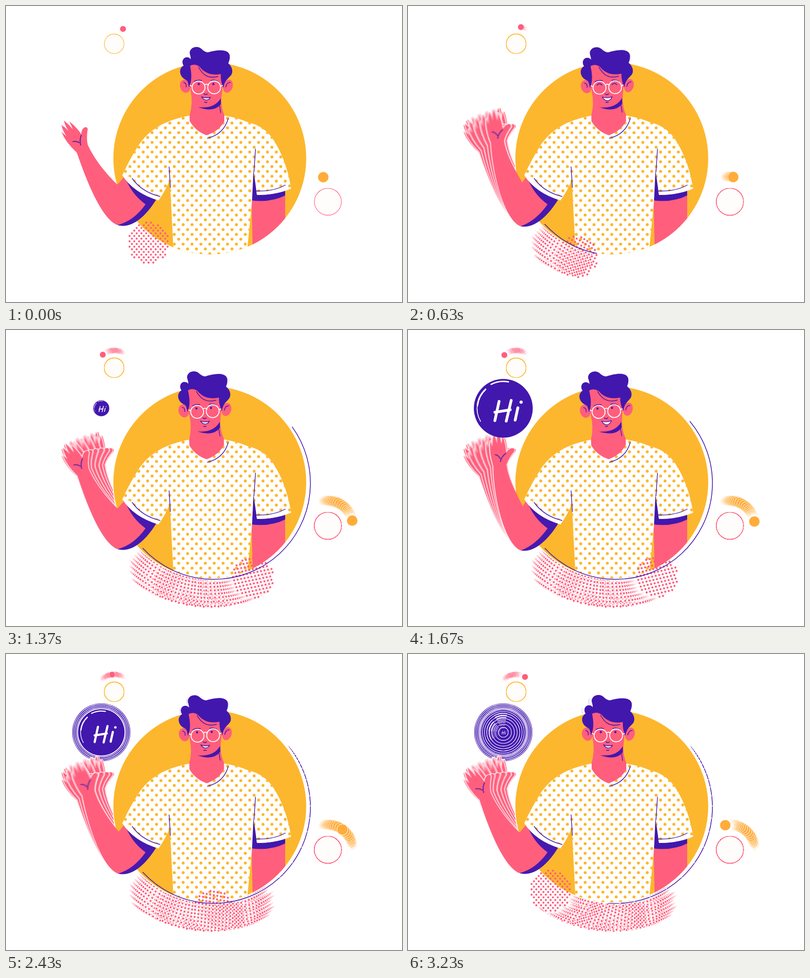
Animation, 800 px wide and 600 px high, one loop 3260 ms. Source, as an HTML page with a canvas:

```html
<!DOCTYPE html>
<html lang="en">
<head>
<meta charset="utf-8">
<title>Waving hello</title>
<style>
html, body { margin: 0; width: 100%; height: 100%; overflow: hidden; background: #fff; }
canvas { display: block; width: 800px; height: 600px; }
</style>
</head>
<body>
<canvas id="stage" width="800" height="600" role="img" aria-label="A man waves and says Hi"></canvas>
<script>
const YELLOW = '#fcb72e', PINK = '#ff5e7d', PURPLE = '#4217ae', ORANGE = '#ffac3b', PAPER = '#fffdfb';
const LOOP = 3260, STEPS = 98, STEP_MS = 100 / 3, WAVE = 14;
const TAU = Math.PI * 2, RAD = Math.PI / 180;
const ctx = document.getElementById('stage').getContext('2d');

// Helpers
const lerp = (a, b, t) => a + (b - a) * t;
const clamp = v => Math.max(0, Math.min(1, v));
const smooth = v => { v = clamp(v); return v * v * (3 - 2 * v); };
const polar = (x, y, r, deg) => [x + r * Math.cos(deg * RAD), y + r * Math.sin(deg * RAD)];

// Cubic ease with flat ends; x1 and x2 are the handle positions.
function ease(x, x1, x2) {
  let lo = 0, hi = 1;
  for (let i = 0; i < 24; i++) {
    const u = (lo + hi) / 2, v = 1 - u;
    if (3 * u * v * v * x1 + 3 * u * u * v * x2 + u * u * u < x) lo = u; else hi = u;
  }
  return lo * lo * (3 - 2 * lo);
}

function keyed(k, keys) {
  for (let i = 1; i < keys.length; i++) {
    const [a, from] = keys[i - 1], [b, to] = keys[i];
    if (k <= b) return lerp(from, to, smooth((k - a) / (b - a)));
  }
  return keys[keys.length - 1][1];
}

function rotate([x, y], [cx, cy], deg) {
  const c = Math.cos(deg * RAD), s = Math.sin(deg * RAD);
  return [cx + (x - cx) * c - (y - cy) * s, cy + (x - cx) * s + (y - cy) * c];
}

function disc(x, y, r) {
  const p = new Path2D();
  p.arc(x, y, Math.max(0, r), 0, TAU);
  return p;
}

function fill(c, path, color) {
  c.fillStyle = color;
  c.fill(typeof path === 'string' ? new Path2D(path) : path);
}

function line(c, path, color, width) {
  c.strokeStyle = color;
  c.lineWidth = width;
  c.lineCap = c.lineJoin = 'round';
  c.stroke(typeof path === 'string' ? new Path2D(path) : path);
}

function layer(w, h) {
  const el = document.createElement('canvas');
  el.width = w;
  el.height = h;
  return el.getContext('2d');
}

// Staggered rows of dots
function dotGrid(x0, y0, cols, rows, dx, dy, r, keep) {
  const p = new Path2D();
  for (let j = 0; j < rows; j++) {
    for (let i = 0; i < cols; i++) {
      const x = x0 + dx * (i + (j % 2) / 2), y = y0 + dy * j;
      if (keep && !keep(x, y)) continue;
      p.moveTo(x + r, y);
      p.arc(x, y, r, 0, TAU);
    }
  }
  return p;
}

// Torso
const backdrop = disc(411.7, 308.8, 194.8);
const torso = makeTorso();

function makeTorso() {
  const c = layer(800, 600);
  c.clip(backdrop);
  fill(c, 'M496 390L564 378V430L570 520H499Z', PINK);
  fill(c, 'M500 328L507 380L564 374V384Q535 399 495 394Z', PURPLE);
  const shirt = new Path2D('M371 222C318 232 290 252 270 279Q250 310 235 343Q258 379 308 394Q324 372 331 351L338 488V520H486L488 487L497 395L500 332L507 383Q546 383 576 370C571 338 560 300 538 268Q520 243 490 236Q466 226 441 222Z');
  fill(c, shirt, '#fff');
  c.save();
  c.clip(shirt);
  fill(c, dotGrid(223.4, 217.5, 21, 31, 17.93, 9.82, 3), YELLOW);
  fill(c, 'M250 346Q273 377 314 387L306 400L225 350ZM505 377Q540 377 566 364L580 372L507 390Z', '#fff');
  c.restore();
  line(c, 'M449 228Q440 260 407 268M329.5 326L332 368M504 290L501 336M255 349.5Q274 377 311 386M506 375Q541 376 564 363', PURPLE, 1.4);
  return c.canvas;
}

// Waving arm
const ARM = { x: 90, y: 190, w: 260, h: 280 };
const ELBOW = [235, 415], WRIST = [153, 291];
const armCache = [];

function drawArm(c, p) {
  const mid = rotate(WRIST, ELBOW, 14 * p);
  const hand = (x, y) => {
    const q = rotate([x, y], WRIST, 32 * p);
    return [q[0] + mid[0] - WRIST[0], q[1] + mid[1] - WRIST[1]];
  };
  const mix = (x, y, x2, y2) => [lerp(x, x2, p), lerp(y, y2, p)];
  const end = mix(225, 444, 228, 447);

  c.beginPath();
  c.moveTo(...hand(143, 297));
  c.bezierCurveTo(...mix(158, 340, 174, 345), ...mix(190, 430, 197, 435), ...end);
  c.quadraticCurveTo(262, 440, 284, 402);
  c.lineTo(262, 360);
  c.lineTo(239, 346);
  c.lineTo(...mix(225, 362, 232, 357));
  c.bezierCurveTo(...mix(202, 340, 222, 333), ...mix(178, 310, 205, 305), ...hand(165, 281));
  c.quadraticCurveTo(...hand(162, 268), ...hand(165, 249));
  c.quadraticCurveTo(...hand(163, 243), ...hand(157, 247));
  c.quadraticCurveTo(...hand(152, 252), ...hand(152, 260));
  c.quadraticCurveTo(...hand(144, 247), ...hand(128, 234));
  c.lineTo(...hand(135, 250));
  c.quadraticCurveTo(...hand(127, 240), ...hand(117, 232));
  c.quadraticCurveTo(...hand(119, 243), ...hand(127, 254));
  c.quadraticCurveTo(...hand(120, 246), ...hand(112, 241));
  c.quadraticCurveTo(...hand(114, 252), ...hand(122, 264));
  c.lineTo(...hand(112, 255));
  c.quadraticCurveTo(...hand(120, 276), ...hand(143, 297));
  c.fillStyle = PINK;
  c.fill();

  c.beginPath();
  c.moveTo(241, 348);
  c.quadraticCurveTo(254, 382, 282, 402);
  c.quadraticCurveTo(258, 436, ...end);
  c.bezierCurveTo(252, 452, 280, 430, 303, 393);
  c.closePath();
  c.fillStyle = PURPLE;
  c.fill();

  c.beginPath();
  c.moveTo(...hand(135, 275));
  c.quadraticCurveTo(...hand(142, 273), ...hand(148, 277));
  c.moveTo(...hand(152, 262));
  c.quadraticCurveTo(...hand(148, 272), ...hand(151, 282));
  c.strokeStyle = PURPLE;
  c.lineWidth = 1.7;
  c.lineCap = 'round';
  c.stroke();
}

// Average of several poses for motion blur, with a white rim to go beneath.
function armPose(n) {
  if (armCache[n]) return armCache[n];
  const blur = layer(ARM.w, ARM.h), rim = layer(ARM.w, ARM.h), samples = 5;
  blur.globalCompositeOperation = 'lighter';
  blur.globalAlpha = 1 / samples;
  for (let i = 0; i < samples; i++) {
    const one = layer(ARM.w, ARM.h);
    one.translate(-ARM.x, -ARM.y);
    const at = n + (i / (samples - 1) - 0.5) * 0.35;
    drawArm(one, 0.5 - 0.5 * Math.cos(at / WAVE * TAU));
    blur.drawImage(one.canvas, 0, 0);
  }
  for (let i = 0; i < 8; i++) {
    rim.drawImage(blur.canvas, ...polar(0, 0, 0.9, i * 45));
  }
  rim.globalCompositeOperation = 'source-in';
  rim.fillStyle = '#fff';
  rim.fillRect(0, 0, ARM.w, ARM.h);
  return armCache[n] = { body: blur.canvas, rim: rim.canvas };
}

// Head
const HAIR = new Path2D('M370 165C367 156 369 152 362 149C351 143 349 130 355 124Q357 121 359 121C353 112 359 103 366 104Q371 104 373 108C374 104 371 98 371 94C373 82 388 80 395 87Q402 94 408 94C425 89 449 86 452 100Q453 108 449 116C458 124 459 134 455 140C448 148 441 152 439 166Q433 152 434 138C411 142 399 133 391 123Q382 116 372 121C375 138 376 150 370 165Z');
const EARS = new Path2D();
EARS.ellipse(362, 162.5, 10.5, 13.5, -0.25, 0, TAU);
EARS.closePath();
EARS.ellipse(448.5, 162.5, 9.5, 13.5, 0.3, 0, TAU);
const NECK = 'M371 118L373 172Q378 196 371 221V233Q383 254 405 262Q430 254 441 234V221Q435 208 435 188L438 160V130L400 112Z';
const LENSES = 'M402 165.3A13 13 0 1 1 376 165.3A13 13 0 1 1 402 165.3ZM433.5 165A13 13 0 1 1 407.5 165A13 13 0 1 1 433.5 165ZM401 160Q405 157 409 160M376.5 163L372 161M433 163L437 161';

function turnHead(c, angle, draw) {
  c.save();
  c.translate(405, 250);
  c.rotate(angle * RAD);
  c.translate(-405, -250);
  draw();
  c.restore();
}

function drawHead(c, angle, happy) {
  turnHead(c, angle, () => {
    fill(c, EARS, PINK);
    fill(c, NECK, PINK);
    line(c, 'M359 155Q365 156 364 164M453 155Q446 155 444 164', PURPLE, 1.5);
    fill(c, 'M388 205Q421 209 434 187V199Q420 217 388 205Z', PURPLE);
    line(c, 'M431 198L433.5 216', PURPLE, 1.4);
    fill(c, HAIR, PURPLE);
    line(c, 'M389 124C397 139 408 148 428 143M380 153Q387 149 395 151M414 151Q421 149 428 153', PURPLE, 1.5);
    line(c, 'M400 178Q404 181 407 178M401 195Q404 196 406 195', PURPLE, 1.6);
    if (happy) {
      line(c, 'M384 160Q389 154 394 160M414 160Q419 154 424 160', PURPLE, 1.6);
    } else {
      const gaze = angle * 0.9;
      fill(c, disc(389.5 + gaze, 158.3, 2.2), PURPLE);
      fill(c, disc(419 + gaze, 158.3, 2.2), PURPLE);
    }
    const mouth = new Path2D(happy || angle < -2
      ? 'M394 184Q404 188 414 184Q411 192 404 192Q398 191 394 184Z'
      : 'M395 184Q404 188 413 185Q410 191 404 190.5Q399 190 395 184Z');
    fill(c, mouth, '#fff');
    line(c, mouth, PURPLE, 1.4);
    line(c, LENSES, '#fff', 1.8);
  });
}

// Greeting bubble
const BUBBLE = [192.5, 158.7], BUBBLE_R = 59.5;

function bubbleScale(k) {
  if (k < 41) return 0;
  if (k < 50) return 1 - Math.pow(1 - (k - 40) / 10, 3);
  const settled = 1 - 0.21 * smooth((k - 50) / 6);
  return k < 90 ? settled : settled * (1 - Math.pow((k - 89) / 9.4, 1.4));
}

function drawBubble(c, s) {
  if (!s) return;
  c.save();
  c.translate(...BUBBLE);
  c.scale(s, s);
  fill(c, disc(0, 0, BUBBLE_R), PURPLE);
  const shine = (r, a, b, w) => {
    const p = new Path2D();
    p.arc(0, 0, r, a * RAD, b * RAD);
    line(c, p, '#fff', w);
  };
  shine(53, 150, 228, 1.6);
  shine(52.5, 186, 227, 3);
  shine(54.5, 243, 281, 2.8);
  line(c, 'M-8.5 -14L-17 25M16 -16L6 26M-17 8L14 3M29.5 -1L24 24', '#fff', 5.6);
  fill(c, disc(36, -12.5, 3.2), '#fff');
  c.restore();
}

// Moving parts around the figure
const halftone = dotGrid(-48, -45.9, 11, 18, 9.6, 5.4, 2.1, (x, y) => Math.hypot(x, y) < 42.5);

function pose(k) {
  const there = 1 - Math.abs(1 - k / (STEPS / 2));
  const orbit = ease(there, 0.7, 0.32);
  const turn = -61.5 * ease(there, 0.64, 0.28);
  const sweep = new Path2D();
  if (orbit > 0.002) {
    sweep.arc(420, 310.5, 195, 137.4 * RAD, (137.4 - 177.4 * orbit) * RAD, true);
  }
  return {
    arm: armPose(k % WAVE),
    head: keyed(k, [[0, 0], [19, -1.4], [24, -1.6], [32, -1.2], [50, -2.7], [62, -2.7], [73, -1.4], [93, 0], [98, 0]]),
    happy: k >= 12 && k < 40,
    turn,
    pinkBall: disc(...polar(218.5, 76.5, 35, -59.3 - 73.5 * orbit), 6),
    orangeBall: disc(...polar(650, 396.7, 50.5, -100.3 + 90.7 * orbit), 10.6),
    bubble: bubbleScale(k),
    sweep
  };
}

// The halftone disc turns with its orbit.
function atSpots(p, draw) {
  ctx.save();
  ctx.translate(...polar(412, 309, 211, 126 + p.turn));
  ctx.rotate(p.turn * RAD);
  draw();
  ctx.restore();
}

function paint(k) {
  const p = pose(k);

  // White rims cut into whatever earlier steps left behind.
  line(ctx, backdrop, '#fff', 3);
  turnHead(ctx, p.head, () => line(ctx, HAIR, '#fff', 1.4));
  ctx.drawImage(p.arm.rim, ARM.x, ARM.y);
  atSpots(p, () => line(ctx, halftone, '#fff', 2.6));
  line(ctx, p.pinkBall, '#fff', 1.8);
  line(ctx, p.orangeBall, '#fff', 1.8);
  if (p.bubble) line(ctx, disc(...BUBBLE, BUBBLE_R * p.bubble), '#fff', 2.2);
  line(ctx, p.sweep, '#fff', 4);

  fill(ctx, backdrop, YELLOW);
  ctx.drawImage(p.arm.body, ARM.x, ARM.y);
  ctx.drawImage(torso, 0, 0);
  drawHead(ctx, p.head, p.happy);
  atSpots(p, () => fill(ctx, halftone, PINK));
  line(ctx, p.sweep, PURPLE, 1.5);

  const ring = (path, color) => { fill(ctx, path, PAPER); line(ctx, path, color, 1.1); };
  ring(disc(218.5, 76.7, 19.8), YELLOW);
  ring(disc(650.3, 396.8, 27.3), PINK);
  fill(ctx, p.pinkBall, PINK);
  fill(ctx, p.orangeBall, ORANGE);
  drawBubble(ctx, p.bubble);
}

// Trails build up step by step, so a jump in time replays the steps before it.
const start = performance.now();
let shown = -1;

function update() {
  const t = (performance.now() - start) % LOOP;
  const k = Math.min(STEPS - 1, Math.floor((t + 5) / STEP_MS));
  if (k < shown) shown = -1;
  if (shown < 0) {
    ctx.fillStyle = '#fff';
    ctx.fillRect(0, 0, 800, 600);
  }
  while (shown < k) paint(++shown);
  requestAnimationFrame(update);
}
update();
</script>
</body>
</html>
```
